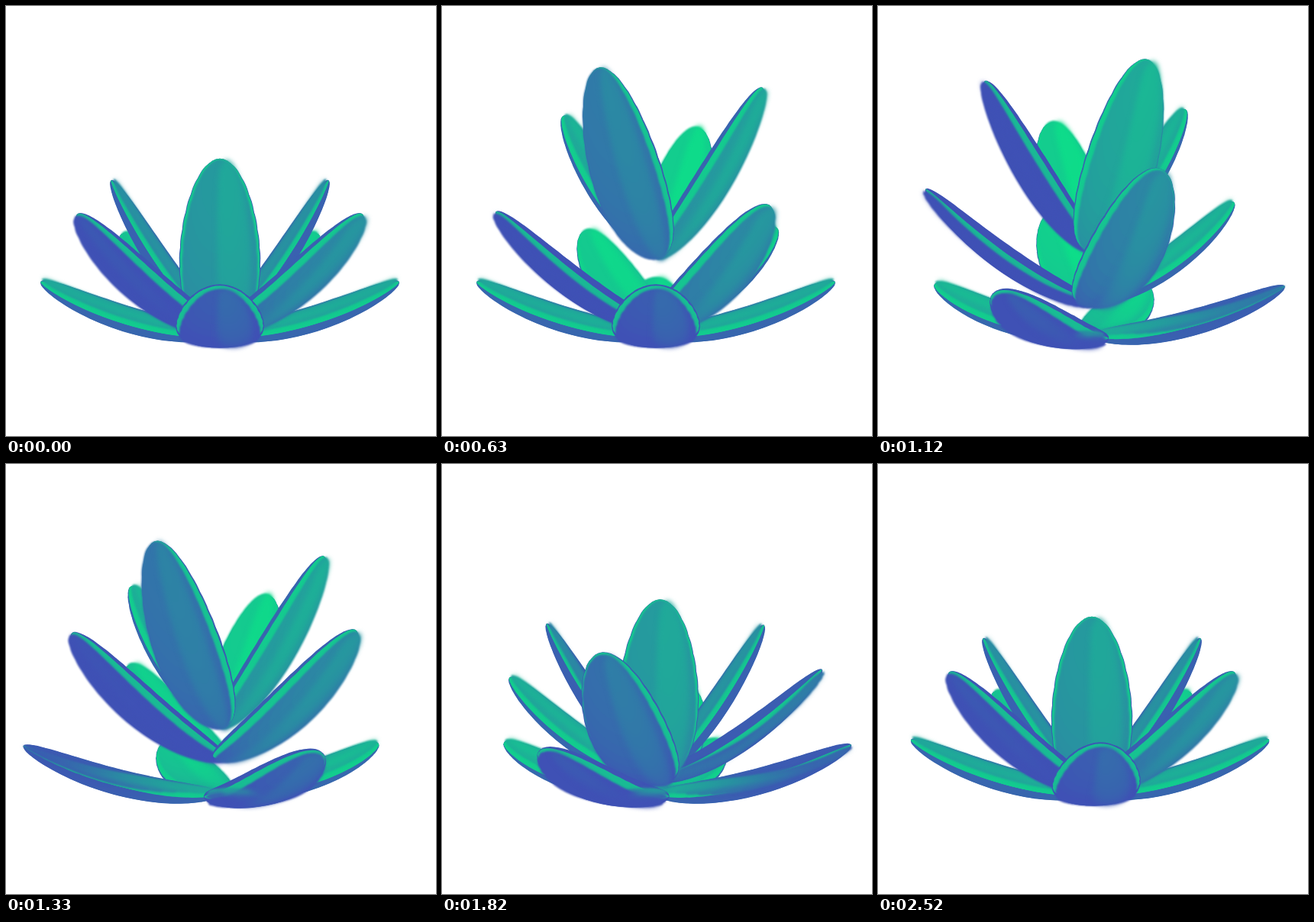
An HTML page without scripts for the animation above (2590 ms loop, 563 by 563 pixels).

```html
<!DOCTYPE html>
<html lang="en">
<head>
<meta charset="utf-8">
<title>Lotus</title>
<style>
/* Animated per layer: turn in degrees, height gained, stretch of the radius, slope at the base */
@property --spin { syntax: "<number>"; inherits: true; initial-value: 0 }
@property --lift { syntax: "<number>"; inherits: true; initial-value: 0 }
@property --grow { syntax: "<number>"; inherits: true; initial-value: 1 }
@property --rise { syntax: "<number>"; inherits: true; initial-value: 0 }
/* Derived values, registered so that each is resolved to a number once */
@property --cos { syntax: "<number>"; inherits: true; initial-value: 1 }
@property --sin { syntax: "<number>"; inherits: true; initial-value: 0 }
@property --e { syntax: "<number>"; inherits: true; initial-value: 0 }
@property --r { syntax: "<number>"; inherits: true; initial-value: 0 }
@property --m { syntax: "<number>"; inherits: true; initial-value: 0 }
@property --ct { syntax: "<number>"; inherits: true; initial-value: 1 }
@property --st { syntax: "<number>"; inherits: true; initial-value: 0 }
@property --drop { syntax: "<number>"; inherits: true; initial-value: 0 }
@property --facing { syntax: "<number>"; inherits: true; initial-value: 0 }
@property --light { syntax: "<number>"; inherits: true; initial-value: 0 }
@property --out { syntax: "<number>"; inherits: true; initial-value: 0 }
@property --ro { syntax: "<number>"; inherits: true; initial-value: 0 }
@property --side { syntax: "<number>"; inherits: true; initial-value: 0 }
@property --zoom { syntax: "<number>"; inherits: true; initial-value: 1 }
@property --u { syntax: "<number>"; inherits: true; initial-value: 0 }
@property --v { syntax: "<number>"; inherits: true; initial-value: 0 }
@property --px { syntax: "<number>"; inherits: true; initial-value: 0 }
@property --py { syntax: "<number>"; inherits: true; initial-value: 0 }
@property --qx { syntax: "<number>"; inherits: true; initial-value: 0 }
@property --qy { syntax: "<number>"; inherits: true; initial-value: 0 }
@property --nx { syntax: "<number>"; inherits: true; initial-value: 0 }
@property --ny { syntax: "<number>"; inherits: true; initial-value: 0 }
@property --l11 { syntax: "<number>"; inherits: true; initial-value: 1 }
@property --l21 { syntax: "<number>"; inherits: true; initial-value: 0 }

html { background: #fff }
html, body { margin: 0; width: 100%; height: 100%; overflow: hidden }
svg { position: absolute; left: 0; top: 0; width: 563px; height: 563px }
svg.defs { width: 0; height: 0 }

/* Spine height over radius r: rise * r + bend * r * r */
.layer { animation: 2590ms linear infinite }
.top { --reach: 142; --rise: .89; --bend: .0037; --base: 78; animation-name: top }
.middle { --reach: 209; --rise: .27; --bend: .0019; --base: 75; --start: 45; animation-name: middle }
.bottom { --reach: 234; --rise: .02; --bend: .0012; --base: 80; animation-name: bottom }

.petal {
  --cos: cos((var(--spin) + var(--start, 0) + var(--at)) * 1deg);
  --sin: sin((var(--spin) + var(--start, 0) + var(--at)) * 1deg);
  z-index: calc(var(--sin) * var(--reach));
}

/* A petal is four chains of flattened ellipsoids along the spine */
.body { --wide: 48; --thick: 16; --shift: 0; --aside: 0; --tone: .15; --gain: .4 }
.rim { --wide: 47; --thick: 4; --shift: 0; --aside: 0; --tone: 1.6; --gain: .4 }
.face { --wide: 44; --thick: 6; --shift: 8; --aside: 0; --tone: .35; --gain: 2.2; filter: blur(1px) }
.glow { --wide: 20; --thick: 1; --shift: 9; --aside: 16; --tone: .55; --gain: 2.2; filter: blur(3px) }

circle {
  r: 1px;
  --e: sin(var(--i) * 9deg);
  --r: calc(var(--reach) * var(--grow) * (.5 - .43 * cos(var(--i) * 9deg)));
  --m: calc(var(--rise) + 2 * var(--bend) * var(--r));
  --ct: calc(1 / hypot(1, var(--m)));
  --st: calc(var(--m) * var(--ct));
  --drop: calc(var(--base) - var(--lift) - var(--r) * (var(--rise) + var(--bend) * var(--r)));
  /* 1 shows the inside of the petal, -1 the outside */
  --facing: clamp(-1, 20 * (var(--ct) * var(--drop) / 730 - var(--st) * var(--sin)
    + var(--st) * var(--cos) * var(--cos) * var(--r) / 730), 1);
  --light: clamp(0, var(--tone) + var(--gain) * (
    var(--facing) * (.4 * var(--ct) - .57 * var(--st) * var(--sin))
    + (1 - var(--facing)) * .2 * var(--st) * var(--cos)), 2);
  --out: calc(var(--shift) * var(--facing) * var(--e));
  --side: calc(-1 * var(--aside) * var(--sin) * var(--e));

  /* perspective of the centre */
  --ro: calc(var(--r) - var(--st) * var(--out));
  --zoom: calc(730 / (730 - var(--ro) * var(--sin) - var(--side) * var(--cos)));
  --u: calc((var(--ro) * var(--cos) - var(--side) * var(--sin)) * var(--zoom) / 730);
  --v: calc((var(--drop) - var(--ct) * var(--out)) * var(--zoom) / 730);

  /* projected half axes: along, across and through the petal */
  --px: calc(.257 * var(--reach) * var(--e) * (var(--cos) + var(--u) * var(--sin)));
  --py: calc(.257 * var(--reach) * var(--e) * (var(--v) * var(--sin) - var(--m)));
  --qx: calc(var(--wide) * var(--e) * (var(--u) * var(--cos) - var(--sin)));
  --qy: calc(var(--wide) * var(--e) * var(--v) * var(--cos));
  --nx: calc(-1 * var(--thick) * var(--e) * var(--st) * (var(--cos) + var(--u) * var(--sin)));
  --ny: calc(-1 * var(--thick) * var(--e) * (var(--ct) + var(--v) * var(--st) * var(--sin)));

  /* outline of the projected ellipsoid */
  --l11: max(.01, hypot(var(--px), var(--qx), var(--nx)));
  --l21: calc((var(--px) * var(--py) + var(--qx) * var(--qy) + var(--nx) * var(--ny)) / var(--l11));
  transform: matrix(
    calc(var(--zoom) * var(--l11)), calc(var(--zoom) * var(--l21)), 0,
    calc(var(--zoom) * sqrt(max(.01, var(--py) * var(--py) + var(--qy) * var(--qy)
      + var(--ny) * var(--ny) - var(--l21) * var(--l21)))),
    calc(280 + 730 * var(--u)), calc(350 + 730 * var(--v)));
  fill: rgb(calc(63 - 25 * var(--light)), calc(81 + 70 * var(--light)), calc(181 - 22 * var(--light)));
}

@keyframes top {
  0% { --spin: 0; --lift: 0; animation-timing-function: ease-in }
  13.5% { --spin: 38; --lift: 45 }
  24.3% { --spin: 115; --lift: 101 }
  33.8% { --spin: 180; --lift: 119 }
  43.2% { --spin: 245; --lift: 110 }
  52.7% { --spin: 308; --lift: 82 }
  62.2% { --spin: 354; --lift: 49; animation-timing-function: ease-out }
  78.4% { --spin: 360; --lift: 4 }
  84%, 100% { --spin: 360; --lift: 0 }
}
@keyframes middle {
  0%, 15.4% { --spin: 0; --lift: 0; animation-timing-function: ease-in }
  24.3% { --spin: 13; --lift: 6 }
  33.8% { --spin: 59; --lift: 24 }
  43.2% { --spin: 117; --lift: 38 }
  52.7% { --spin: 194; --lift: 43 }
  62.2% { --spin: 270; --lift: 33; animation-timing-function: ease-out }
  78.4% { --spin: 356; --lift: 3 }
  86%, 100% { --spin: 360; --lift: 0 }
}
@keyframes bottom {
  0%, 32.4% { --spin: 0; --grow: 1; --rise: .02; animation-timing-function: ease-in }
  43.2% { --spin: 19; --grow: 1.025; --rise: -.01 }
  62.2% { --spin: 137; --grow: 1.07; --rise: -.05 }
  78.4% { --spin: 271; --grow: 1.015; --rise: .01; animation-timing-function: ease-out }
  97.3%, 100% { --spin: 358; --grow: 1; --rise: .02 }
}
</style>
</head>
<body>
<svg class="defs"><defs>
  <g id="chain">
    <circle style="--i:1"/><circle style="--i:2"/><circle style="--i:3"/><circle style="--i:4"/>
    <circle style="--i:5"/><circle style="--i:6"/><circle style="--i:7"/><circle style="--i:8"/>
    <circle style="--i:9"/><circle style="--i:10"/><circle style="--i:11"/><circle style="--i:12"/>
    <circle style="--i:13"/><circle style="--i:14"/><circle style="--i:15"/><circle style="--i:16"/>
    <circle style="--i:17"/><circle style="--i:18"/><circle style="--i:19"/>
  </g>
  <g id="petal">
    <use href="#chain" class="body"/>
    <use href="#chain" class="rim"/>
    <use href="#chain" class="face"/>
    <use href="#chain" class="glow"/>
  </g>
</defs></svg>
<div class="layer top">
  <svg class="petal" style="--at:0"><use href="#petal"/></svg>
  <svg class="petal" style="--at:90"><use href="#petal"/></svg>
  <svg class="petal" style="--at:180"><use href="#petal"/></svg>
  <svg class="petal" style="--at:270"><use href="#petal"/></svg>
</div>
<div class="layer middle">
  <svg class="petal" style="--at:0"><use href="#petal"/></svg>
  <svg class="petal" style="--at:90"><use href="#petal"/></svg>
  <svg class="petal" style="--at:180"><use href="#petal"/></svg>
  <svg class="petal" style="--at:270"><use href="#petal"/></svg>
</div>
<div class="layer bottom">
  <svg class="petal" style="--at:0"><use href="#petal"/></svg>
  <svg class="petal" style="--at:90"><use href="#petal"/></svg>
  <svg class="petal" style="--at:180"><use href="#petal"/></svg>
  <svg class="petal" style="--at:270"><use href="#petal"/></svg>
</div>
</body>
</html>
```
